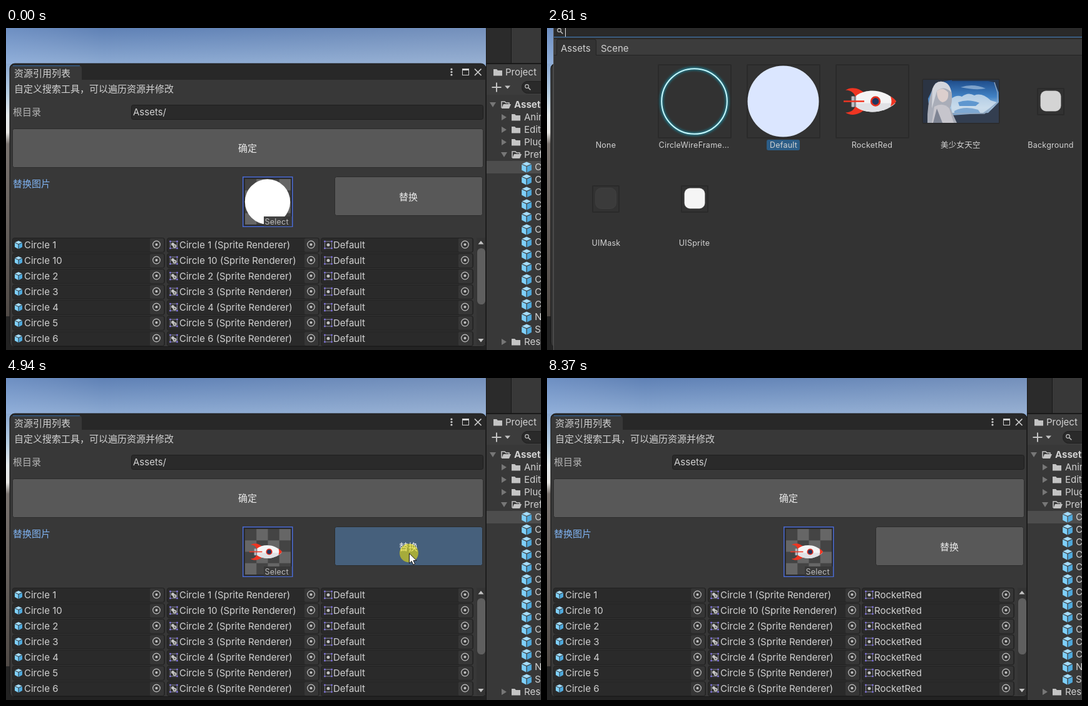
An HTML page for the animation above (8.67 s loop, 855 by 516 pixels).

```html
<!DOCTYPE html>
<html lang="zh">
<head>
<meta charset="utf-8">
<title>资源引用列表</title>
<style>
html, body { margin: 0; width: 100%; height: 100%; overflow: hidden; background: #222; }
svg { display: block; width: 855px; height: 516px; }
text { font-family: Inter, "Noto Sans CJK SC", "Noto Sans CJK", sans-serif; white-space: pre; }
.win text { font-family: "Open Sans", "Noto Sans CJK SC", "Noto Sans CJK", sans-serif; }
</style>
</head>
<body>
<svg id="stage" viewBox="0 0 855 516" xmlns="http://www.w3.org/2000/svg"></svg>
<script>
const LOOP = 8670;
const stage = document.getElementById('stage');

// Markup helpers
const rect = (x, y, w, h, fill, more = '') =>
  `<rect x="${x}" y="${y}" width="${w}" height="${h}" fill="${fill}" ${more}/>`;
const box = (x, y, w, h, fill, line, r = 3) =>
  rect(x + .5, y + .5, w - 1, h - 1, fill, `stroke="${line}" rx="${r}"`);
const path = (d, fill, more = '') => `<path d="${d}" fill="${fill}" ${more}/>`;
const line = (d, color, w = 1) => path(d, 'none', `stroke="${color}" stroke-width="${w}"`);
const circle = (x, y, r, fill, more = '') =>
  `<circle cx="${x}" cy="${y}" r="${r}" fill="${fill}" ${more}/>`;
const text = (x, cy, str, fill = '#d2d2d2', size = 15, more = '') =>
  `<text x="${x}" y="${Math.round(cy + size * .36)}" fill="${fill}" font-size="${size}" ${more}>${str}</text>`;
const group = (inner, more = '') => `<g ${more}>${inner}</g>`;
const at = (x, y, inner, k = 1) => group(inner, `transform="translate(${x} ${y}) scale(${k})"`);
const repeat = (n, fn) => Array.from({ length: n }, (_, i) => fn(i)).join('');
const MID = 'text-anchor="middle"';

// Icons
const cube = (x, y, k) => at(x, y,
  path('M0-8L7-5L0-2L-7-5Z', '#a5dcfa') + path('M-7.5-4L-.6-1V8L-7.5 4.5Z', '#7fd0fb') +
  path('M7.5-4L.6-1V8L7.5 4.5Z', '#4fa9dc'), k);
const picker = (x, y) =>
  circle(x, y, 5.8, 'none', 'stroke="#c4c4c4" stroke-width="1.2"') + circle(x, y, 2, '#c4c4c4');
const sprite = (x, y, inner) => at(x, y,
  line('M-4-5.5H4M-4 5.5H4M-5.5-4V4M5.5-4V4', '#8c8c9c') +
  [-5.5, 5.5].map(a => [-5.5, 5.5].map(b => rect(a - 1.2, b - 1.2, 2.4, 2.4, '#8b7cf0')).join('')).join('') + inner);
const blob = circle(-1.5, -1, 2.5, '#c4c4c4') + circle(1.5, 2, 3, '#c4c4c4') + circle(1.5, 2, 1, '#333');
const folder = (x, y) => path(`M${x} ${y - 5}h5l2 2h7v8.5h-14Z`, '#c4c4c4');
const openFolder = (x, y) =>
  line(`M${x + 1} ${y + 5}v-10h5l2 2h5v3`, '#c4c4c4', 1.5) + path(`M${x + 4} ${y - 1}h12l-3 7h-12Z`, '#c4c4c4');
const arrow = (x, y, open) =>
  path(open ? `M${x - 5} ${y - 4}h10l-5 8Z` : `M${x - 4} ${y - 5}v10l8-5Z`, '#777');
const lens = (x, y) =>
  circle(x - 1.5, y - 1.5, 2.8, 'none', 'stroke="#c4c4c4" stroke-width="1.2"') +
  line(`M${x + .8} ${y + .8}l3.5 3.5`, '#c4c4c4', 1.5);
const checker = (x, y, size, n, flip) => {
  const c = size / n;
  return rect(x, y, size, size, '#444') + repeat(n * n, i => {
    const a = i % n, b = i / n | 0;
    return (a + b + flip) % 2 ? rect(x + a * c, y + b * c, c, c, '#666') : '';
  });
};
const fin = 'M-39-18C-30-24-17-22-7-12C-13-12-19-10-23-6C-24-13-30-18-39-18Z';
const rocket = path(fin, '#ef3522') + group(path(fin, '#ef3522'), 'transform="scale(1 -1)"') +
  rect(-30, -8, 8, 17, '#8d8d93') + rect(-28, -8, 2, 17, '#d6d6da') +
  path('M-22-9C-8-20 22-22 42 0C22 22-8 20-22 9Z', '#f4f4f5') +
  path('M-22 3H41C22 21-8 20-22 9Z', '#e0e1e5') +
  path('M33-8C37-6 40-3 42 0C40 3 37 6 33 8C35 3 35-3 33-8Z', '#ef3522') +
  line('M-42 0H-9', '#ef3522', 2.6) +
  circle(9, 0, 6.8, '#20365f', 'stroke="#e23020" stroke-width="2.8"');

// Editor behind everything
const scene = rect(0, 0, 767, 516, 'url(#sky)') + rect(0, 0, 767, 57, 'url(#haze)') +
  rect(0, 462, 767, 54, '#232323');

const tree = [['Anim', 143], ['Editor', 163], ['Plugins', 183], ['Prefabs', 203], ['Resources', 503]];
const project = rect(767, 0, 88, 516, '#191919') + rect(768, 0, 39, 56, '#2b2b2b') +
  rect(808, 0, 47, 56, '#383838') + rect(768, 58, 87, 26, '#3c3c3c') +
  rect(768, 83, 87, 25, '#3c3c3c') + rect(768, 107, 87, 409, '#383838') +
  folder(779, 71) + text(798, 71, 'Project') +
  line('M776.5 95H791.5M784 87.5V102.5', '#c4c4c4', 2) + path('M797 92.5h9l-4.5 5Z', '#c4c4c4') +
  box(824, 85, 60, 20, '#2a2a2a', '#1f1f1f', 9) + lens(834, 95) +
  rect(768, 213, 87, 20, '#4d4d4d') +
  arrow(778, 123, true) + openFolder(791, 123) + text(812, 123, 'Assets', '#d2d2d2', 15, 'font-weight="700"') +
  tree.map(([name, y]) => arrow(796, y, name === 'Prefabs') +
    (name === 'Prefabs' ? openFolder : folder)(808, y) + text(828, y, name)).join('') +
  repeat(14, i => cube(832, 223 + 20 * i, 1.05) +
    text(845, 223 + 20 * i, i < 12 ? 'Circle' : i < 13 ? 'Node' : 'Square'));

const rows = [1, 10, 2, 3, 4, 5, 6].map((n, i) => {
  const y = 336 + 25 * i, c = y + 11.5;
  const cell = x => box(x, y, 244, 24, '#2a2a2a', '#202020') + rect(x + 220, y + 1, 22, 22, '#363636', 'rx="2"') +
    picker(x + 230.5, c - .5);
  return cell(10) + cell(257) + cell(503) + cube(20, c, .8) + text(29, c + .5, 'Circle ' + n) +
    sprite(268, c, blob) + text(277, c + .5, `Circle ${n} (Sprite Renderer)`) +
    sprite(515, c, circle(0, 0, 2.5, '#c4c4c4')) + text(523, c + .5, 'Default', '#d2d2d2', 15, 'class="value"');
}).join('');

const tool = rect(6, 57, 761, 453.5, '#282828', 'rx="8" stroke="#1a1a1a"') +
  path('M7 83H766V504Q766 510 760 510H13Q7 510 7 504Z', '#383838') +
  path('M7 84V66Q7 60 13 60H116Q121 60 121 65V84Z', '#383838') + line('M11 60.5H118', '#35618f', 1.5) +
  text(13, 73, '资源引用列表') + text(13, 98, '自定义搜索工具，可以遍历资源并修改') +
  [66, 70.5, 75].map(y => circle(712, y, 1.6, '#d0d0d0')).join('') +
  rect(729.5, 65.5, 10, 10, 'none', 'stroke="#d0d0d0"') + rect(729, 65, 11, 3, '#d0d0d0') +
  line('M749 65.5L759.5 76M759.5 65.5L749 76', '#d0d0d0', 1.7) +
  text(11, 135, '根目录', '#b4b4b4') + box(200, 123, 563, 24, '#2a2a2a', '#1e1e1e') + text(203, 135, 'Assets/') +
  box(10, 161, 753, 63, '#585858', '#2c2c2c') + text(386, 193, '确定', '#eaeaea', 15, MID) +
  text(11, 250, '替换图片', '#7fb2f0', 15, 'id="caption"') +
  rect(378.75, 238.75, 79, 79.5, '#2a2a2a', 'stroke="#4a6bd6" stroke-width="1.5"') + checker(382, 242, 73, 4, 0) +
  circle(418, 278.5, 36.2, '#fff', 'id="disc"') + group(at(415, 278.5, rocket, .62), 'id="ship"') +
  rect(412, 302, 45, 16, '#383838', 'opacity=".95"') +
  text(413.5, 310, 'Select', '#bcbcbc', 12.5, 'letter-spacing=".25"') +
  rect(525.5, 238.5, 236, 62, '#585858', 'id="apply" rx="3" stroke="#2c2c2c"') +
  text(643, 271, '替换', '#eaeaea', 15, MID) +
  group(rows, 'clip-path="url(#body)"') +
  rect(752, 336, 14, 172, '#343434') + rect(753, 353, 13, 90, '#5f5f5f', 'rx="6"') +
  path('M754.5 346.5h9l-4.5-5.5Z', '#c4c4c4') + path('M754.5 498h9l-4.5 5.5Z', '#c4c4c4');

// Sprite chooser, laid out at its own origin
const frame = (x, y, w, h) =>
  rect(x - w / 2, y - h / 2, w, h, '#323232', 'stroke="#2a2a2a" stroke-width="2" rx="1"');
const tile = (x, y, fill) => frame(x, y + .5, 42, 42) +
  rect(x - 16.5, y - 17, 33, 33, fill, 'rx="9" stroke="#555" stroke-opacity=".3"');
const name = (x, y, s) => text(x, y, s, '#d2d2d2', 12.5, MID + ' letter-spacing=".25"');
const skyPicture = at(601, 83,
  rect(0, 0, 121, 69, 'url(#photo)') +
  path('M44 31Q54 23 62 27Q72 19 82 25Q94 20 108 33L118 36 96 53H46Z', '#d3e1ee', 'opacity=".8"') +
  path('M56 36Q72 30 90 37L84 42H58Z', '#5f97cf') + path('M60 12Q80 5 100 14Q84 17 60 12Z', '#b4cde6', 'opacity=".6"') +
  path('M50 50Q66 41 88 48L94 57H50Z', '#7ea8d2') +
  path('M0 0H48L20 5 8 30 12 69H0Z', '#2b3443') + path('M46 0H121V20L114 4 104 2H46Z', '#27364c') +
  path('M121 36L104 53 46 57 40 69H121Z', '#333e50') +
  line('M114 4L119 20V36L98 54H50', '#94a8bf', 1.3) +
  path('M7 69Q6 40 15 14Q20 1 31 3Q43 5 46 22Q47 38 43 45L54 69Z', '#a9adb8') +
  path('M15 15Q20 1 31 3Q43 5 45 20Q34 8 22 18L14 46Z', '#d2d5dc') +
  path('M22 18Q31 10 40 20Q42 34 31 36Q22 33 22 18Z', '#dccfcd') +
  path('M18 43Q32 35 42 46L49 69H14Z', '#c6c5cc') + path('M22 46L31 69H16Z', '#7e8493'));

const chooser = rect(10, -45, 1000, 1000, '#333') +
  rect(10, -45, 1000, 37, 'url(#title)') + rect(10, -8, 1000, 52, '#3c3c3c') + rect(10, -8, 1000, 3, '#2d2d2d') +
  rect(10, -5, 1000, 20, '#2a2a2a') + line('M10-4.5H1010M10 14.5H1010', '#3a79bb') +
  lens(21, 5) + line('M29.5-2V14', '#e0e0e0') + rect(10, 16, 1000, 2, '#2b2b2b') +
  line('M10 43.5H1010', '#232323') +
  path('M15.5 45V21Q15.5 18 18.5 18H75Q78.5 18 78.5 21V45Z', '#333', 'stroke="#232323"') +
  rect(12, 44, 900, 2, '#333') + text(22, 33, 'Assets') + text(86, 33, 'Scene') +
  line('M10.5-8V955', '#565656') +
  name(94, 187, 'None') +
  frame(236, 117.5, 116, 117) +
  circle(235.5, 117.5, 52.5, 'none', 'stroke="#14a8c6" stroke-width="4" filter="url(#glow)" opacity=".8"') +
  circle(235.5, 117.5, 52.3, 'none', 'stroke="#c8f8fd" stroke-width="2"') + name(235, 187, 'CircleWireFrame...') +
  frame(378, 117.5, 116, 117) + circle(377.5, 117.5, 57, '#dbe6ff') +
  rect(351, 179, 53, 17, '#2c5d87', 'id="pickOld" rx="3"') + name(378, 187, 'Default') +
  frame(520, 117.5, 116, 117) + at(516, 117.5, rocket) +
  rect(482, 179, 74, 17, '#2c5d87', 'id="pickNew" rx="3"') + name(519.5, 187, 'RocketRed') +
  frame(661.5, 117.5, 122, 70) + skyPicture + name(661, 187, '美少女天空') +
  tile(805, 117.5, '#d4d4d4') + name(805, 187, 'Background') +
  tile(94, 273.5, '#3b3b3b') + name(94.5, 344, 'UIMask') +
  tile(236, 273.5, '#f5f5f5') + name(235.5, 344, 'UISprite') +
  rect(11, 730, 1000, 225, '#282828') + line('M11 730.5H1010', '#4a4a4a') +
  line('M713 732.5H740M713 736.5H740', '#777') +
  checker(16, 736, 94, 8, 1) + circle(63, 783, 47, '#fff') + text(120, 750, 'Default', '#c4c4c4');

const dialog = rect(403, 2, 446, 180, '#000', 'rx="8" opacity=".45" filter="url(#soft)"') +
  rect(403, 1.5, 446, 179.5, '#f0f0f0', 'rx="7" stroke="#999" stroke-width=".6"') +
  path('M403.5 38V9Q403.5 2 410 2H842Q848.5 2 848.5 9V38Z', 'url(#title)') +
  text(413, 20, '温馨提示', '#111') + rect(823, 10, 25, 25, '#c43c45') +
  line('M832 19.5l6 6M838 19.5l-6 6', '#fff', 1.5) +
  rect(422, 55, 64, 64, '#000') + text(526, 60, '替换图片成功', '#111') +
  rect(742.5, 138.5, 85, 25, '#fdfdfd', 'id="ok" rx="3" stroke="#0f78c8"') +
  text(785, 152, 'okk', '#222', 12, MID);

const pointer = circle(0, -.5, 15, '#fff000', 'opacity=".52"') +
  path('M.5 0V16L4.2 12.5L6.8 18.2L9.6 17L7 11.5H12Z', '#fff', 'stroke="#111"');

const stops = list => list.map(([o, c, a = 1]) => `<stop offset="${o}" stop-color="${c}" stop-opacity="${a}"/>`).join('');
const ramp = (id, list, dir = 'x2="0" y2="1"') => `<linearGradient id="${id}" ${dir}>${stops(list)}</linearGradient>`;
const blur = (id, s) => `<filter id="${id}" x="-20%" y="-20%" width="140%" height="140%"><feGaussianBlur stdDeviation="${s}"/></filter>`;
stage.innerHTML = '<defs>' +
  ramp('sky', [[0, '#5f81b5'], [.11, '#8ba9d2'], [.2, '#b6cee2'], [.27, '#e6ecee'], [.325, '#e8e8e5'], [.36, '#7a7470'], [.9, '#4f4945']]) +
  ramp('haze', [[0, '#a8c8f8', .2], [.2, '#c8d8f0', 0], [.6, '#d8dcdf', .08], [1, '#c8ccd4', .2]], '') +
  ramp('title', [[0, '#eeeef6'], [.5, '#f2eff4'], [1, '#f6f0ee']], '') +
  ramp('photo', [[0, '#1d4a88'], [.4, '#4283c6'], [.65, '#a9c8e4'], [1, '#4b6a92']]) +
  blur('glow', 2) + blur('soft', 5) +
  '<clipPath id="body"><rect x="7" y="330" width="745" height="180"/></clipPath></defs>' +
  scene + project + tool + group(chooser, 'id="chooser"') +
  group(dialog, 'id="dialog" class="win"') + group(pointer, 'id="pointer"');

const $ = id => document.getElementById(id);
const [caption, disc, ship, apply, pickOld, pickNew, ok, chooserEl, dialogEl, pointerEl] =
  ['caption', 'disc', 'ship', 'apply', 'pickOld', 'pickNew', 'ok', 'chooser', 'dialog', 'pointer'].map($);
const values = [...document.querySelectorAll('.value')];

// Motion: [time, x, y], eased between steps
const pointerSteps = [
  [90, 790, 532], [360, 480, 430], [520, 282, 382], [730, 422, 326], [950, 422, 326], [1060, 434, 312],
  [1210, 434, 312], [1450, 600, -60], [1490, 600, -257], [2220, 600, -263],
  [2610, 480, -24], [3070, 463, -7], [3190, 463, -7], [3450, 503, 134], [3900, 503, 134],
  [4550, 633, 288], [4580, 633, 288], [4680, 644, 281], [6020, 644, 281], [6570, 786, 152],
  [7200, 786, 152], [7620, 518, 394], [8100, 518, 401], [8360, 784, 536]
];
const chooserSteps = [[2220, 120, -239], [2610, 0, 0], [3070, -17, 17]];

function track(steps, t) {
  const i = steps.findIndex(s => s[0] > t);
  if (i < 0) return steps[steps.length - 1].slice(1);
  if (!i) return steps[0].slice(1);
  const [t0, x0, y0] = steps[i - 1], [t1, x1, y1] = steps[i];
  const p = (t - t0) / (t1 - t0), e = p * p * (3 - 2 * p);
  return [x0 + (x1 - x0) * e, y0 + (y1 - y0) * e];
}
const within = (t, a, b) => t >= a && t < b;
const show = (el, on) => el.setAttribute('visibility', on ? 'visible' : 'hidden');

function draw(t) {
  const choosing = within(t, 1210, 3850), picked = t >= 3710, done = t >= 6940;
  show(chooserEl, choosing);
  if (choosing) {
    const [x, y] = track(chooserSteps, t).map(Math.round);
    chooserEl.setAttribute('transform', `translate(${x} ${y})`);
  }
  pickOld.setAttribute('opacity', picked ? 0 : 1);
  pickNew.setAttribute('opacity', picked ? 1 : 0);
  show(disc, !picked);
  show(ship, picked);
  caption.setAttribute('fill', choosing ? '#b4b4b4' : '#7fb2f0');
  apply.setAttribute('fill', within(t, 4940, 6940) ? '#46607c' : '#585858');
  for (const v of values) v.textContent = done ? 'RocketRed' : 'Default';

  show(dialogEl, within(t, 5040, 6940));
  const p = Math.min(1, Math.max(0, (t - 5040) / 200)), k = .92 + .08 * p * (2 - p);
  dialogEl.setAttribute('opacity', p);
  dialogEl.setAttribute('transform', `translate(${626 * (1 - k)} ${91 * (1 - k)}) scale(${k})`);
  ok.setAttribute('fill', t < 6480 ? '#fdfdfd' : t < 6800 ? '#e0eef9' : '#d9eaf8');

  pointerEl.setAttribute('transform', `translate(${track(pointerSteps, t).join(' ')})`);
}

const start = performance.now();
function tick() {
  draw((performance.now() - start) % LOOP);
  requestAnimationFrame(tick);
}
tick();
</script>
</body>
</html>
```
